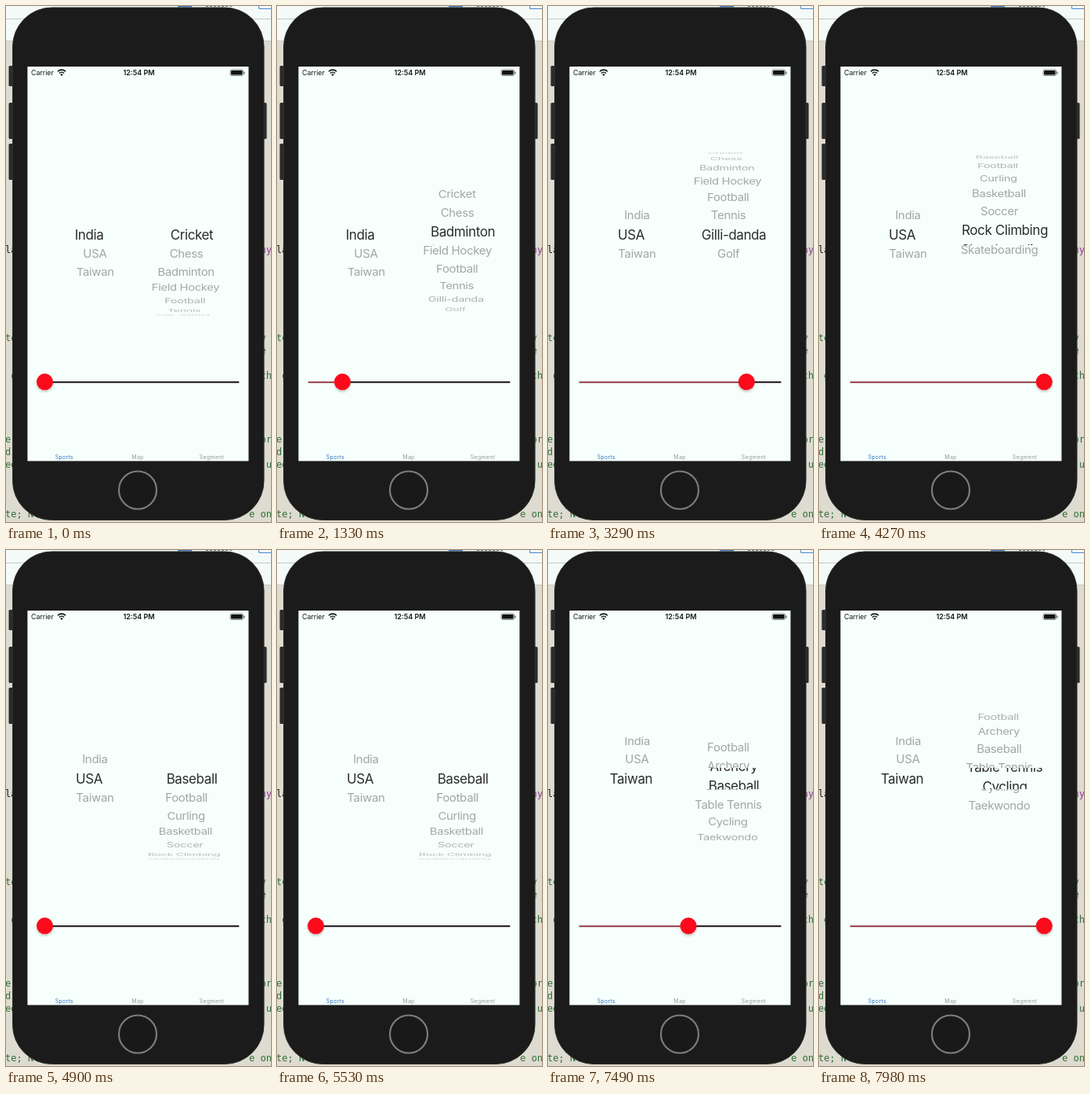
Recreate the animation shown at these times as an HTML page. Size 338 px wide and 656 px high, loop 8000 ms.

```html
<!DOCTYPE html>
<html lang="en">
<head>
<meta charset="utf-8">
<title>Sports picker</title>
<style>
  html, body { margin: 0; width: 100%; height: 100%; overflow: hidden; background: #dedbd0; }
  svg { display: block; width: 338px; height: 656px; }
  text { font-family: Inter, Roboto, "Liberation Sans", sans-serif; }
  .code text { font: 12px "DejaVu Sans Mono", "Liberation Mono", monospace; fill: #2f6e38; white-space: pre; }
  .code .end { text-anchor: end; }
  .dim text { font-size: 15px; letter-spacing: -.3px; fill: #a2a6a4; text-anchor: middle; }
  .lit text { font-size: 17px; letter-spacing: -.4px; fill: #2a2d2b; text-anchor: middle; }
  .tabs text { font-size: 7px; letter-spacing: .25px; fill: #969b99; text-anchor: middle; }
  .status { font-size: 9px; fill: #151515; }
</style>
</head>
<body>
<svg viewBox="0 0 338 656">
  <defs>
    <clipPath id="band"><rect x="27" y="277" width="282" height="27"/></clipPath>
    <clipPath id="outside">
      <rect x="27" y="186" width="282" height="91"/>
      <rect x="27" y="304" width="282" height="89.500"/>
    </clipPath>
    <filter id="soft" x="-50%" y="-50%" width="200%" height="200%"><feGaussianBlur stdDeviation="1.8"/></filter>
  </defs>

  <!-- editor window behind the phone -->
  <rect width="338" height="656" fill="#dedbd0"/>
  <rect width="338" height="44" fill="#f4faf8"/>
  <path d="M0 16.500H338M0 44.500H338" stroke="#c4c9c8"/>
  <path d="M219 .5H237" stroke="#3f78bd" stroke-width="2"/>
  <path d="M322.500 0V3.500H338" fill="none" stroke="#4a86cc"/>
  <path d="M255 .5H290" stroke="#777" stroke-dasharray="3 2"/>
  <g class="code" id="code"></g>

  <!-- phone -->
  <g fill="#2b2b2b">
    <rect x="3.500" y="76" width="7" height="26" rx="1.500"/>
    <rect x="3.500" y="123" width="7" height="46" rx="1.500"/>
    <rect x="3.500" y="175" width="7" height="46" rx="1.500"/>
    <rect x="326" y="123" width="6.500" height="46" rx="1.500"/>
  </g>
  <rect x="8.500" y="2" width="320.500" height="651.500" rx="50" fill="#1b1b1b" stroke="#2f302f"/>
  <circle cx="168" cy="615.500" r="24" fill="#191919" stroke="#7b7c7b" stroke-width="2.200"/>
  <rect x="27.400" y="77" width="282" height="501.500" fill="#f6fffb"/>

  <!-- status bar -->
  <text class="status" x="32" y="88" style="font-size:8.800px">Carrier</text>
  <g fill="none" stroke="#151515" stroke-width="1.600">
    <path d="M66 83.200A7 7 0 0 1 76 83.200"/>
    <path d="M67.900 85.500A4.400 4.400 0 0 1 74.100 85.500"/>
  </g>
  <path d="M69.200 87L71 89L72.800 87A2.600 2.600 0 0 0 69.200 87Z" fill="#151515"/>
  <text class="status" x="169.500" y="88" text-anchor="middle" font-weight="600">12:54 PM</text>
  <rect x="286" y="81" width="16.500" height="7.500" rx="1.800" fill="none" stroke="#555" stroke-width=".7"/>
  <rect x="287" y="82" width="14.500" height="5.600" rx="1" fill="#111"/>
  <path d="M304 83.500V86.500" stroke="#444"/>

  <!-- picker -->
  <g class="dim" id="dim" clip-path="url(#outside)"></g>
  <g class="lit" id="lit" clip-path="url(#band)"></g>

  <!-- slider -->
  <path id="rest" stroke="#1d0d16" stroke-width="2"/>
  <path id="fill" stroke="#85202c" stroke-width="1.700"/>
  <g id="thumb">
    <circle cy="480" r="10.500" fill="#402028" opacity=".25" filter="url(#soft)"/>
    <circle cy="477.800" r="10.500" fill="#fc0a1c"/>
  </g>

  <g class="tabs">
    <text x="74.300" y="576" style="fill:#2f78c8">Sports</text>
    <text x="168" y="576">Map</text>
    <text x="262.500" y="576">Segment</text>
  </g>
</svg>

<script>
const LOOP = 8000, STEP = 70;
const MID = 290.6, RADIUS = 104, ANGLE = 0.237, AXIS = 168;
const COUNTRIES = ["India", "USA", "Taiwan"];
const SPORTS = [
  ["Cricket", "Chess", "Badminton", "Field Hockey", "Football", "Tennis", "Gilli-danda", "Golf"],
  ["Baseball", "Football", "Curling", "Basketball", "Soccer", "Rock Climbing", "Skateboarding"],
  ["Football", "Archery", "Baseball", "Table Tennis", "Cycling", "Taekwondo"]
];

const ease = {
  hold: p => p < 1 ? 0 : 1,
  line: p => p,
  in: p => p * p,
  out: p => p * (2 - p),
  both: p => p * p * (3 - 2 * p)
};

// Each step: time, value, easing on the way to it.
const countryRow = [[0, 0], [2450, 0], [2940, 1, "both"], [5700, 1], [6400, 2, "both"]];
const sportRow = [
  [0, 0], [350, 0], [800, 1, "both"],
  [1050, 1], [1330, 2.16, "in"], [2030, 6, "out"],
  [4060, 6], [4270, 5.22, "in"], [4690, 0, "out"],
  [6900, 0], [7490, 1.64, "in"], [7980, 3.58, "line"]
];
const sliderPos = [
  [0, 0], [840, 1 / 7, "hold"], [2100, 6 / 7, "hold"], [3360, 1, "hold"],
  [4760, 0, "hold"], [6790, 0], [7490, 0.545, "both"], [7910, 1, "both"]
];
const listIndex = [[0, 0], [3360, 1, "hold"], [6580, 2, "hold"]];

function valueAt(steps, t) {
  const i = steps.findIndex(s => s[0] > t);
  if (i < 0) return steps[steps.length - 1][1];
  const [t0, v0] = steps[i - 1], [t1, v1, kind = "line"] = steps[i];
  return v0 + (v1 - v0) * ease[kind]((t - t0) / (t1 - t0));
}

const $ = id => document.getElementById(id);

function addText(parent, label) {
  const el = document.createElementNS("http://www.w3.org/2000/svg", "text");
  el.textContent = label;
  parent.append(el);
  return el;
}

function makeWheel(labels, dimX, litX) {
  const rows = labels.map(s => [addText($("dim"), s), addText($("lit"), s)]);
  return (pos, visible) => rows.forEach(([dim, lit], i) => {
    const a = (i - pos) * ANGLE;
    const depth = Math.cos(a);
    const y = MID + RADIUS * Math.sin(a);
    const s = 1 - (1 - depth) * 0.08;
    const dimOn = visible && Math.abs(a) < 1.5;
    const litOn = visible && Math.abs(i - pos) < 1.3;
    dim.style.display = dimOn ? "" : "none";
    lit.style.display = litOn ? "" : "none";
    dim.style.opacity = 0.45 + 0.55 * Math.min(1, depth * 1.3);
    const place = (el, x, drop) => el.setAttribute("transform",
      `translate(${x} ${y}) scale(${s} ${s * depth}) translate(0 ${drop})`);
    place(dim, AXIS + (dimX - AXIS) * s, 5.4);
    place(lit, litX, 6.1);
  });
}

const countryWheel = makeWheel(COUNTRIES, 113.3, 106);
const sportWheels = SPORTS.map(list => makeWheel(list, 230.2, 237));

// Code fragments visible on either side: y, left, right.
[
  [314, "la", "ny"], [426, "te", "y "], [442, " '", "e "], [474, " g", "th"],
  [555, "e", "or"], [571, "d", ""], [587, "ed", "u"], [650, "te; N", "e on"]
].forEach(([y, left, right], i) => {
  const a = addText($("code"), left), b = addText($("code"), right);
  a.setAttribute("x", -1);
  b.setAttribute("x", 339);
  b.setAttribute("class", "end");
  a.setAttribute("y", y);
  b.setAttribute("y", y);
  if (i === 0) {
    a.style.fill = "#1b1b1b";
    b.style.fill = "#8b3a94";
  }
});

function draw(t) {
  const list = valueAt(listIndex, t);
  const row = valueAt(sportRow, t);
  countryWheel(valueAt(countryRow, t), true);
  sportWheels.forEach((wheel, i) => wheel(row, i === list));
  const x = 49.5 + 237.7 * valueAt(sliderPos, t);
  $("thumb").setAttribute("transform", `translate(${x} 0)`);
  $("fill").setAttribute("d", `M39.700 478.300H${x}`);
  $("rest").setAttribute("d", `M${x} 478.300H297.300`);
}

const start = performance.now();
function tick() {
  const t = (performance.now() - start) % LOOP;
  draw(Math.floor(t / STEP) * STEP);
  requestAnimationFrame(tick);
}
tick();
</script>
</body>
</html>
```
